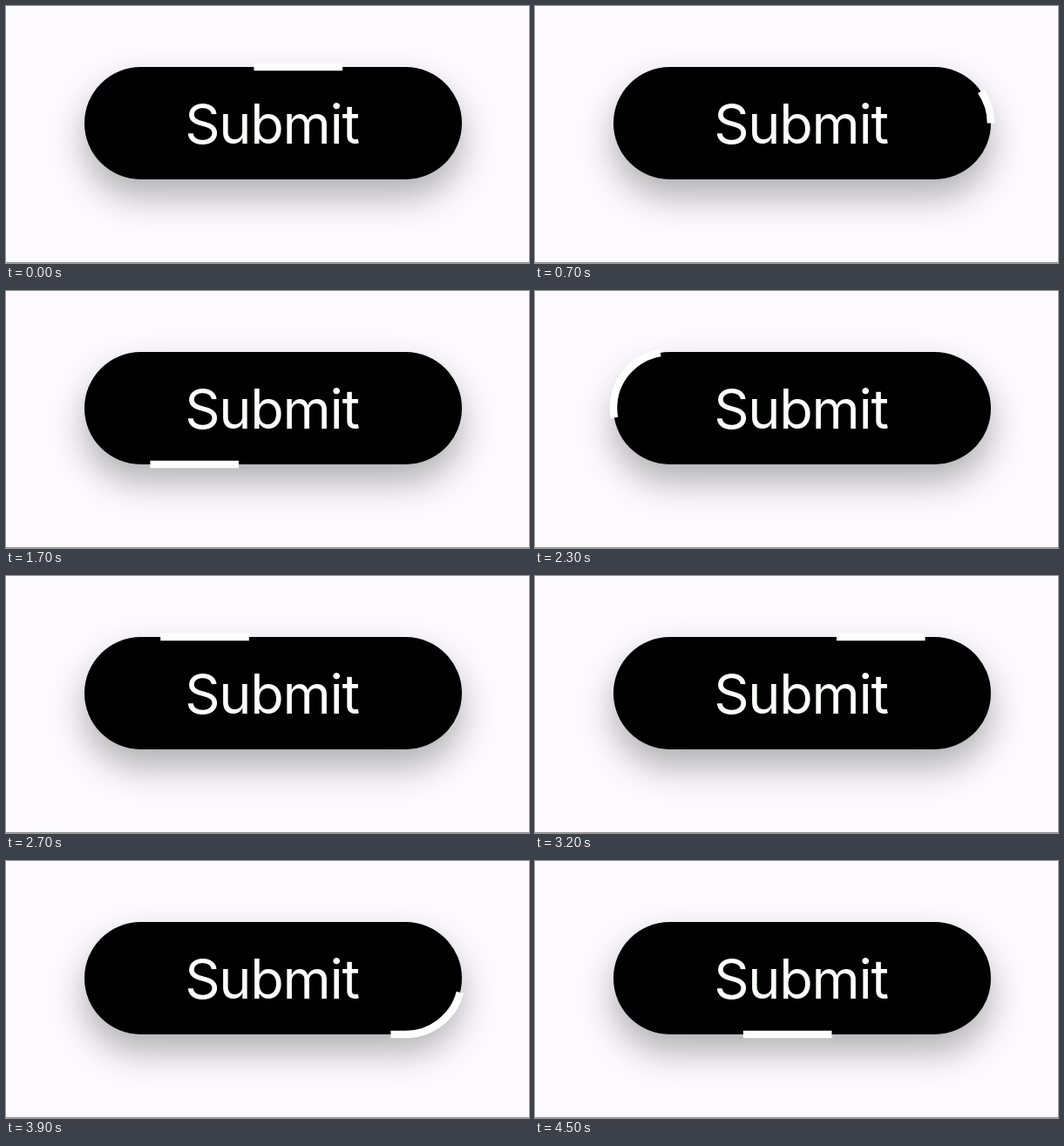
An HTML page for the animation above (4.6 s loop, 600 by 295 pixels).

```html
<!DOCTYPE html>
<html lang="en">
<head>
<meta charset="utf-8">
<title>Submit button</title>
<style>
  html, body { margin: 0; width: 100%; height: 100%; overflow: hidden; background: #fcfafe; }
  svg { display: block; }
  .shadow { filter: blur(20px); opacity: .3; }
  #runner { fill: none; stroke: #fff; stroke-width: 8.6; }
  text {
    font: 400 63px Inter, "Liberation Sans", sans-serif;
    letter-spacing: -.02em;
    text-anchor: middle;
    fill: #fcfffc;
  }
</style>
</head>
<body>
<svg width="600" height="295" viewBox="0 0 600 295">
  <rect class="shadow" x="90" y="90" width="433" height="129" rx="64.5"/>
  <rect x="90" y="70" width="433" height="129" rx="64.5"/>
  <text x="305" y="158">Submit</text>
  <!-- The outline starts at the right end, so the dash is cut off there -->
  <path id="runner" d="M523 134.5A64.5 64.5 0 0 1 458.5 199H154.5A64.5 64.5 0 0 1 154.5 70H458.5A64.5 64.5 0 0 1 523 134.5"/>
  <rect y="294" width="600" height="1" fill="#929194"/>
</svg>
<script>
  const LOOP = 4600, STEP = 100;
  const START = 737.4, SPEED = 0.3375, LAP = 1018.5, DASH = 101.6;
  const runner = document.getElementById('runner');
  runner.style.strokeDasharray = `${DASH} 2000`;

  function draw(now) {
    // a few ms of slack keeps early frame callbacks on the right step
    const time = Math.floor((now + 8) / STEP) * STEP % LOOP;
    const tail = (START + SPEED * time) % LAP;
    runner.style.strokeDashoffset = -tail;
    requestAnimationFrame(draw);
  }
  draw(performance.now());
</script>
</body>
</html>
```
